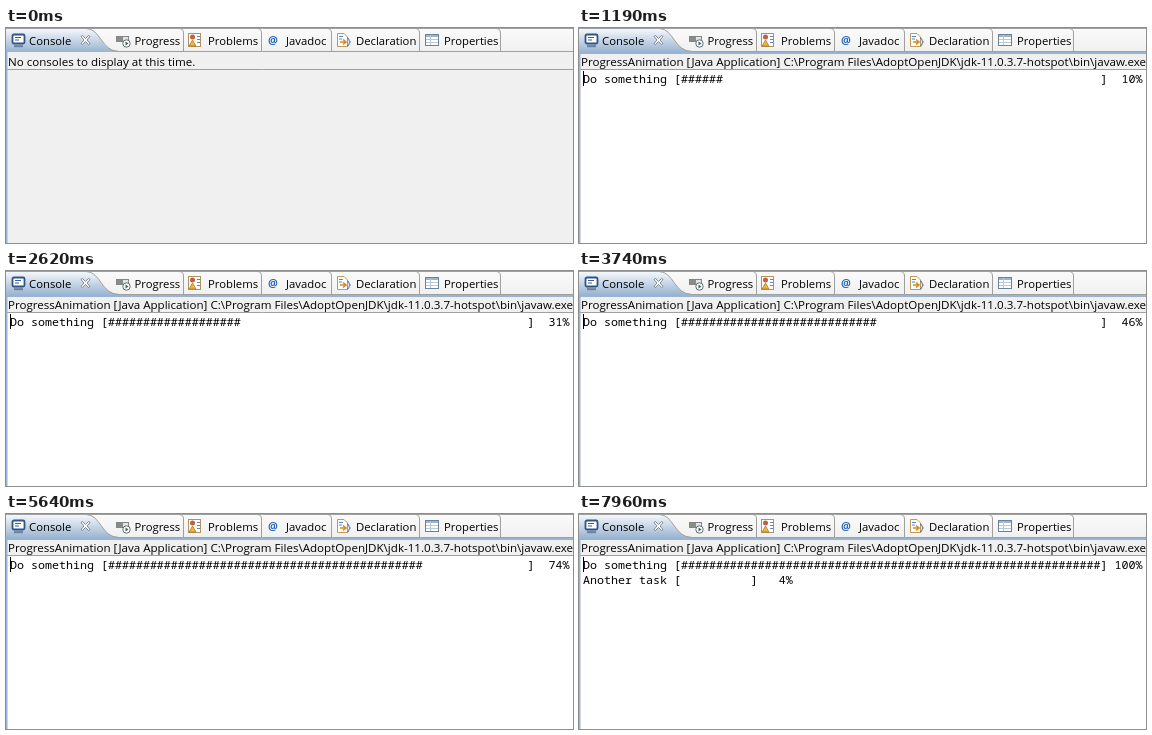
An HTML page that plays this animation: 567 by 215 pixels, repeating every 8000 ms.

```html
<!DOCTYPE html>
<html lang="en">
<head>
<meta charset="utf-8">
<title>Console progress</title>
<style>
  html, body { margin: 0; width: 100%; height: 100%; overflow: hidden; background: #f0f0f0; }
  svg { display: block; }
  text { white-space: pre; fill: #000; }
  .ui { font: 11.58px "Open Sans", "Noto Sans", sans-serif; }
  .tab { font-size: 11.3px; }
  .mono { font: 11.667px "Noto Sans Mono", "Liberation Mono", monospace; }
  .edge { fill: none; stroke: #a0a0a0; }
</style>
</head>
<body>
<svg width="567" height="215" viewBox="0 0 567 215">
  <defs>
    <linearGradient id="strip" x1="0" y1="0" x2="0" y2="1">
      <stop offset="0" stop-color="#fbfbfb"/><stop offset="1" stop-color="#f0f0f0"/>
    </linearGradient>
    <linearGradient id="active" x1="0" y1="0" x2="0" y2="1">
      <stop offset="0" stop-color="#f4f7fb"/><stop offset="1" stop-color="#99b4d1"/>
    </linearGradient>
  </defs>

  <rect width="567" height="215" fill="#f0f0f0"/>
  <rect width="567" height="24" fill="url(#strip)"/>
  <path class="edge" d="M0 .5H567M0 23.5H567M0 41.5H567"/>
  <path d="M0 24V1H80C95 1 95 23 113 23V24Z" fill="url(#active)"/>
  <path class="edge" d="M80 .5C95 .5 95 23.5 113 23.5"/>
  <g id="page">
    <rect y="42" width="567" height="173" fill="#fff"/>
    <rect y="24" width="567" height="2" fill="#99b4d1"/>
    <path d="M4.5 43V58" stroke="#000"/>
  </g>
  <rect y="24" width="1.5" height="191" fill="#99b4d1"/>

  <g id="tabs" class="ui"></g>

  <!-- console: monitor -->
  <rect x="6.5" y="6.5" width="12" height="9" rx="1.5" fill="#fff" stroke="#2f5486" stroke-width="1.8"/>
  <path d="M9 9.5H15M9 12H13" stroke="#38619a"/>
  <path d="M8 18.2H17" stroke="#6b7f9c" stroke-width="2"/>
  <!-- close -->
  <path d="M75 8.5L76.5 7.5L79.5 10.5L82.5 7.5L84 8.5L81 12L84 15.5L82.5 16.5L79.5 13.5L76.5 16.5L75 15.5L78 12Z"
        fill="#fff" stroke="#747f8c" stroke-width=".9"/>
  <!-- progress: bar with play badge -->
  <rect x="110.5" y="8.5" width="12" height="5" fill="#e4e4e4" stroke="#858585"/>
  <rect x="111" y="9" width="6" height="4" fill="#878d87"/>
  <circle cx="120.5" cy="15.5" r="3.7" fill="#fff" stroke="#5e6b78"/>
  <path d="M119.5 13.5L122.5 15.5L119.5 17.5Z" fill="#47604f"/>
  <!-- problems: sheet with markers -->
  <rect x="182.5" y="5.5" width="12" height="13" fill="#fff" stroke="#b09360"/>
  <circle cx="186.5" cy="9" r="2.5" fill="#c0603f"/>
  <path d="M183 18L186.5 12L190 18Z" fill="#ebb73c" stroke="#a5701d" stroke-width=".7"/>
  <path d="M191 8.5H194M191 11.5H194M191 14.5H194" stroke="#6485b0"/>
  <!-- declaration: sheet with arrow and brace -->
  <path d="M331.5 5.5H338L341.5 9V18.5H331.5Z" fill="#fff" stroke="#c09a55"/>
  <path d="M333 8.5H337M333 11H336" stroke="#6485b0"/>
  <path d="M334 14H339M337 11.5L340 14L337 16.5" fill="none" stroke="#d58a26" stroke-width="1.6"/>
  <path d="M341 10Q343 10 343 12T344.5 14Q343 14 343 16T341 18" fill="none" stroke="#4b6ca3"/>
  <!-- properties: table -->
  <rect x="419.5" y="6.5" width="13" height="11" fill="#fff" stroke="#6d8198"/>
  <rect x="420" y="7" width="12" height="2" fill="#9fb4cc"/>
  <path d="M424.5 7V17M420 11.5H432M420 14.5H432" stroke="#b9c8d6"/>

  <text id="header" class="ui" x="2" y="38"></text>
  <text id="first" class="mono" x="4" y="55"></text>
  <text id="second" class="mono" x="4" y="70"></text>
</svg>
<script>
const LOOP = 8000;
const LAUNCH = 450, FIRST_TASK = 490, SECOND_TASK = 7450;
const IDLE = "No consoles to display at this time.";
const RUNNING = "ProgressAnimation [Java Application] C:\\Program Files\\AdoptOpenJDK\\jdk-11.0.3.7-hotspot\\bin\\javaw.exe";

// The first task runs at an almost steady pace through these [time, percent] points.
const pace = [[FIRST_TASK, 0], [2620, 31.2], [3740, 46.2], [6940, 93.2], [SECOND_TASK, 100]];

const $ = id => document.getElementById(id);

function addTab(label, x, separator) {
  const text = `<text class="tab" x="${x}" y="17">${label}</text>`;
  const edge = separator
    ? `<path class="edge" d="M${separator - 4} .5Q${separator + .5} .5 ${separator + .5} 5V23"/>` : "";
  $("tabs").insertAdjacentHTML("beforeend", text + edge);
}
addTab("Console", 23);
addTab("Progress", 128.5, 177);
addTab("Problems", 202, 255);
addTab("Javadoc", 280, 325);
addTab("Declaration", 350, 413);
addTab("Properties", 438, 494);
$("tabs").insertAdjacentHTML("beforeend",
  '<text x="262" y="16" style="font-size:11px;font-weight:700;fill:#2867b5">@</text>');

function firstPercent(t) {
  const i = pace.findIndex(point => point[0] > t);
  if (i < 0) return 100;
  const [t0, p0] = pace[i - 1], [t1, p1] = pace[i];
  return Math.floor(p0 + (p1 - p0) * (t - t0) / (t1 - t0));
}

// The second task pauses briefly, then gains one percent every 93 ms.
const secondPercent = t => Math.max(0, Math.floor((t - 7587) / 93));

function progressLine(label, width, percent) {
  const filled = Math.min(width, Math.round(width * (percent + .5) / 100));
  return `${label} [${"#".repeat(filled).padEnd(width)}] ${String(percent).padStart(3)}%`;
}

function setText(id, value) {
  if ($(id).textContent !== value) $(id).textContent = value;
}

function render(t) {
  const running = t >= LAUNCH;
  $("page").style.display = running ? "" : "none";
  setText("header", running ? RUNNING : IDLE);
  setText("first", t >= FIRST_TASK ? progressLine("Do something", 60, firstPercent(t)) : "");
  setText("second", t >= SECOND_TASK ? progressLine("Another task", 10, secondPercent(t)) : "");
}

const start = performance.now();
function tick() {
  render((performance.now() - start) % LOOP);
  requestAnimationFrame(tick);
}
render(0);
requestAnimationFrame(tick);
</script>
</body>
</html>
```
